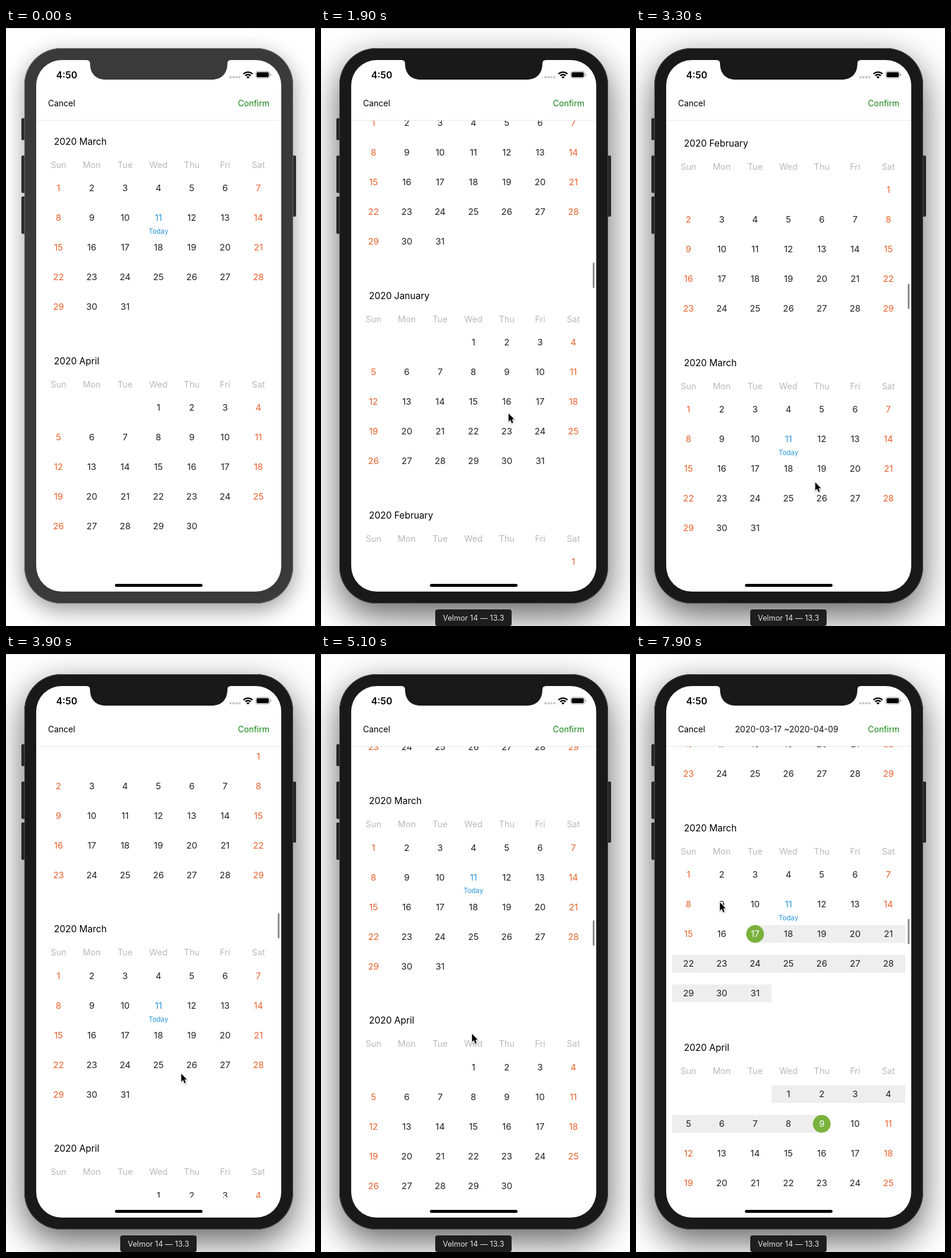
Recreate the animation shown at these times as an HTML page with a canvas. Size 522 by 1008 pixels, loop 8000 ms.

```html
<!DOCTYPE html>
<html lang="en">
<head>
<meta charset="utf-8">
<title>Calendar range picker</title>
<style>
html, body { margin: 0; width: 100%; height: 100%; overflow: hidden; background: #fff; }
canvas { display: block; width: 522px; height: 1008px; }
</style>
</head>
<body>
<canvas id="stage"></canvas>
<script>
const W = 522, H = 1008, LOOP = 8000, STEP = 100;
const canvas = document.getElementById('stage');
const ctx = canvas.getContext('2d');
const dpr = window.devicePixelRatio || 1;
canvas.width = W * dpr;
canvas.height = H * dpr;

const FONT = 'Inter, "Open Sans", sans-serif';
const COLOR = {
  ink: '#222', weekend: '#e8622c', weekday: '#b9b9b9', today: '#2a97d8',
  pick: '#7ab23d', range: '#eee', confirm: '#118312'
};
const MONTHS = ['January', 'February', 'March', 'April', 'May', 'June', 'July',
  'August', 'September', 'October', 'November', 'December'];
const DAYS = ['Sun', 'Mon', 'Tue', 'Wed', 'Thu', 'Fri', 'Sat'];

const LEFT = 61, CELL = 394 / 7, MONTH_H = 370, ROW_H = 50;
const VIEW = { top: 156, bottom: 916 };
const day = (m, d) => Date.UTC(2020, m, d);
const TODAY = day(2, 11), START = day(2, 17), END = day(3, 9);

// Moments of the hard changes, in ms
const AT = { label: 500, active: 1100, thumb: 1400, start: 6000, end: 6900 };

const SCROLL = [[1300, 0], [1500, -36], [1700, -240], [1900, -1000], [2100, -1950],
  [2400, -2905.5], [2600, -3110], [2700, -3040], [2850, -2200], [3050, -1050],
  [3300, -373], [3600, -340], [4000, -240], [4400, -10], [4600, 44.5],
  [4800, 50], [5200, -85], [5400, -102]];

const POINTER = [[300, 10, 700], [900, 320, 575], [1300, 330, 566], [1500, 326, 602],
  [1700, 318, 760], [2000, 315, 610], [2400, 306, 805], [2700, 300, 830],
  [3000, 300, 650], [3300, 302, 765], [3700, 300, 750], [4200, 285, 620],
  [4600, 277, 579], [5000, 262, 660], [5400, 223, 509], [5800, 196, 468],
  [6000, 196, 468], [6300, 335, 740], [6700, 317, 790], [7300, 317, 790], [7900, 141, 418]];

// Monotone cubic through keys [time, value...]
function track(keys, t, k = 1) {
  const last = keys.length - 1;
  if (t <= keys[0][0]) return keys[0][k];
  if (t >= keys[last][0]) return keys[last][k];
  const slope = i => (i < 0 || i >= last) ? 0 :
    (keys[i + 1][k] - keys[i][k]) / (keys[i + 1][0] - keys[i][0]);
  const tangent = i => {
    const a = slope(i - 1), b = slope(i);
    return a * b > 0 ? 2 * a * b / (a + b) : 0;
  };
  let i = 0;
  while (t > keys[i + 1][0]) i++;
  const span = keys[i + 1][0] - keys[i][0];
  const u = (t - keys[i][0]) / span, v = 1 - u;
  return v * v * (1 + 2 * u) * keys[i][k] + u * u * (3 - 2 * u) * keys[i + 1][k] +
    span * u * v * (v * tangent(i) - u * tangent(i + 1));
}

// y is the middle of the capitals
function text(str, x, y, size, color, align = 'center', weight = 400) {
  ctx.font = `${weight} ${size}px ${FONT}`;
  ctx.textAlign = align;
  ctx.fillStyle = color;
  ctx.fillText(str, x, y + size * 0.364);
}

function box(x, y, w, h, r, color) {
  ctx.beginPath();
  ctx.roundRect(x, y, w, h, r);
  ctx.fillStyle = color;
  ctx.fill();
}

function disc(x, y, r, color) {
  ctx.beginPath();
  ctx.arc(x, y, r, 0, Math.PI * 2);
  ctx.fillStyle = color;
  ctx.fill();
}

function drawBody(active) {
  const shell = active ? '#191919' : '#3a3a3a';
  ctx.save();
  ctx.shadowColor = active ? 'rgba(0,0,0,.62)' : 'rgba(0,0,0,.4)';
  ctx.shadowBlur = (active ? 58 : 36) * dpr;
  ctx.shadowOffsetY = (active ? 20 : 11) * dpr;
  box(31, 34, 454, 936, 62, shell);
  ctx.restore();

  const key = active ? '#272727' : '#2c2c2c';
  for (const [x, y, h] of [[26, 152, 37], [26, 215, 63], [26, 284, 63], [483, 215, 103]]) {
    box(x, y, 7, h, 2, key);
  }
  box(31, 34, 454, 936, 62, shell);
  ctx.beginPath();
  ctx.roundRect(31.5, 34.5, 453, 935, 61.5);
  ctx.strokeStyle = active ? '#4a4a4a' : '#6a6a6a';
  ctx.lineWidth = 1;
  ctx.stroke();
  box(51, 54, 414, 896, 43, '#fff');

  ctx.beginPath();
  ctx.moveTo(136, 53);
  ctx.lineTo(136, 54);
  ctx.quadraticCurveTo(142, 54, 142, 60);
  ctx.bezierCurveTo(142, 77, 152, 87, 169, 87);
  ctx.lineTo(347, 87);
  ctx.bezierCurveTo(364, 87, 374, 77, 374, 60);
  ctx.quadraticCurveTo(374, 54, 380, 54);
  ctx.lineTo(380, 53);
  ctx.fillStyle = shell;
  ctx.fill();
}

function drawStatus() {
  text('4:50', 102.5, 79, 15.8, '#000', 'center', 600);
  for (let i = 0; i < 4; i++) disc(379.2 + i * 5, 83, 2.1, '#c6c6c6');

  ctx.save();
  ctx.beginPath();
  ctx.moveTo(408.8, 85.2);
  ctx.lineTo(397.8, 74);
  ctx.lineTo(397.8, 70);
  ctx.lineTo(419.8, 70);
  ctx.lineTo(419.8, 74);
  ctx.clip();
  disc(408.8, 85, 3.6, '#000');
  ctx.strokeStyle = '#000';
  ctx.lineWidth = 2.3;
  for (const r of [6.5, 10.7]) {
    ctx.beginPath();
    ctx.arc(408.8, 85, r, Math.PI, Math.PI * 2);
    ctx.stroke();
  }
  ctx.restore();

  ctx.beginPath();
  ctx.roundRect(421.8, 73, 23.6, 11.4, 3.4);
  ctx.strokeStyle = '#a2a2a2';
  ctx.lineWidth = 1;
  ctx.stroke();
  box(423.3, 74.5, 20.6, 8.4, 2, '#000');
  box(446.4, 76.7, 1.5, 4, [0, 1.5, 1.5, 0], '#a2a2a2');
}

function drawHeader(t) {
  ctx.fillStyle = '#e9e9e9';
  ctx.fillRect(51, 155, 414, 1);
  text('Cancel', 71, 127, 14, '#000', 'left');
  text('Confirm', 445, 127, 14, COLOR.confirm, 'right');
  const iso = d => new Date(d).toISOString().slice(0, 10);
  if (t >= AT.end) text(`${iso(START)} ~${iso(END)}`, 254.5, 127, 14, '#111');
  else if (t >= AT.start) text(iso(START), 254.5, 127, 14, '#111');
}

function drawDay(date, x, y, weekday, t) {
  const picked = (date === START && t >= AT.start) || (date === END && t >= AT.end);
  const inRange = t >= AT.end && date >= START && date <= END;
  if (inRange) {
    const from = date === START ? x : x - CELL / 2;
    const to = date === END ? x : x + CELL / 2;
    ctx.fillStyle = COLOR.range;
    ctx.fillRect(Math.round(from), y - 15, Math.round(to) - Math.round(from), 30);
  }
  if (picked) disc(x, y, 15, COLOR.pick);

  let color = COLOR.ink;
  if (picked) color = '#fff';
  else if (date === TODAY) color = COLOR.today;
  else if (!inRange && weekday % 6 === 0) color = COLOR.weekend;
  text(new Date(date).getUTCDate(), x, y, 15, color);
  if (date === TODAY) text('Today', x, y + 23, 11.5, COLOR.today);
}

function drawMonth(offset, y, t) {
  const first = new Date(day(2 + offset, 1));
  const year = first.getUTCFullYear(), month = first.getUTCMonth();
  const lead = first.getUTCDay();
  const count = new Date(Date.UTC(year, month + 1, 0)).getUTCDate();
  const colX = c => LEFT + CELL * (c + 0.5) - 0.5;

  text(`${year} ${MONTHS[month]}`, 81, y, 15.5, '#000', 'left');
  DAYS.forEach((name, c) => text(name, colX(c), y + 39.5, 14.5, COLOR.weekday));
  for (let d = 1; d <= count; d++) {
    const slot = lead + d - 1, c = slot % 7;
    drawDay(Date.UTC(year, month, d), colX(c), y + 79 + ROW_H * Math.floor(slot / 7), c, t);
  }
}

function drawList(t) {
  const scroll = track(SCROLL, t);
  ctx.save();
  ctx.beginPath();
  ctx.rect(51, VIEW.top, 414, VIEW.bottom - VIEW.top);
  ctx.clip();
  const firstShown = Math.floor((scroll - 35) / MONTH_H);
  for (let m = firstShown; m <= firstShown + 3; m++) {
    drawMonth(m, 191 + m * MONTH_H - scroll, t);
  }
  ctx.restore();
  if (t >= AT.thumb) box(459, 452 + scroll / 17.65, 3, 43, 1.5, '#8e8e8e');
}

function drawPointer(t) {
  if (t < POINTER[0][0] + STEP) return;
  ctx.save();
  ctx.translate(track(POINTER, t, 1), track(POINTER, t, 2));
  ctx.beginPath();
  ctx.moveTo(0.8, 0.8);
  for (const [x, y] of [[0.8, 14.4], [3.9, 11.5], [6.2, 17], [8.6, 16], [6.3, 10.7], [10.5, 10.7]]) {
    ctx.lineTo(x, y);
  }
  ctx.closePath();
  ctx.shadowColor = 'rgba(0,0,0,.35)';
  ctx.shadowBlur = 2 * dpr;
  ctx.shadowOffsetY = dpr;
  ctx.strokeStyle = '#fff';
  ctx.lineWidth = 2;
  ctx.stroke();
  ctx.shadowColor = 'transparent';
  ctx.fillStyle = '#000';
  ctx.fill();
  ctx.restore();
}

function draw(t) {
  ctx.setTransform(dpr, 0, 0, dpr, 0, 0);
  ctx.fillStyle = '#fff';
  ctx.fillRect(0, 0, W, H);
  drawBody(t >= AT.active);
  ctx.fillStyle = '#dadada';
  ctx.fillRect(0, 0, W, 1);
  drawStatus();
  drawList(t);
  drawHeader(t);
  box(184, 937, 148, 5, 2.5, '#000');
  if (t >= AT.label) {
    box(193, 980, 129, 28, 4, '#1e1e1e');
    text('Velmor 14 — 13.3', 257.5, 994.5, 12.8, '#e4e4e4');
  }
  drawPointer(t);
}

const begin = performance.now();
function tick() {
  const t = (performance.now() - begin) % LOOP;
  draw(Math.floor(t / STEP) * STEP);
  requestAnimationFrame(tick);
}
tick();
</script>
</body>
</html>
```
